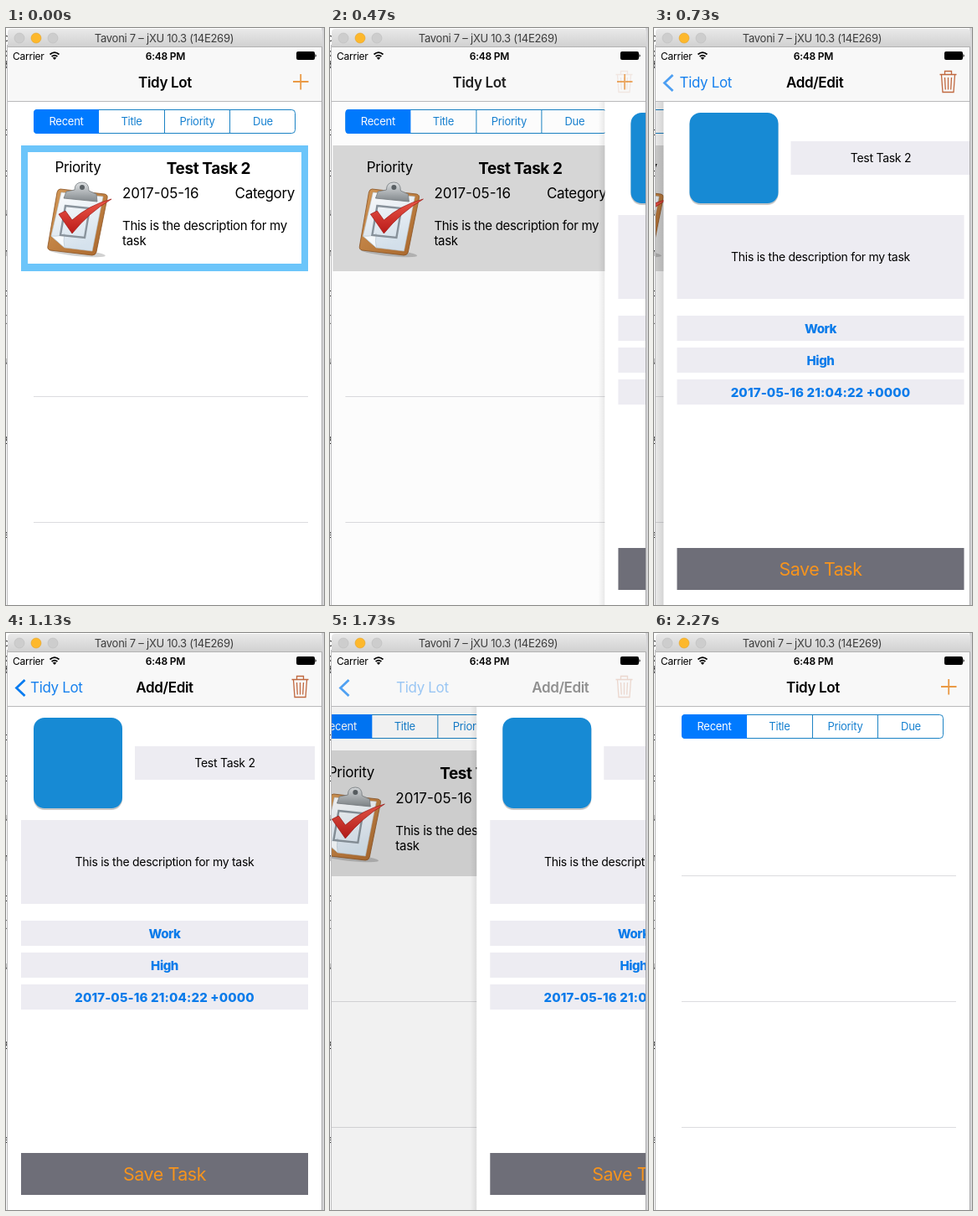
Recreate the animation shown at these times as an HTML page. Size 380 px wide and 688 px high, loop 2340 ms.

```html
<!DOCTYPE html>
<html lang="en">
<head>
<meta charset="utf-8">
<title>Task list</title>
<style>
  html, body { margin: 0; width: 100%; height: 100%; overflow: hidden; background: #fff; }
  svg { display: block; width: 380px; height: 688px; }
  text { font: 17px Inter, "Open Sans", sans-serif; letter-spacing: -.02em; white-space: pre; }
  .mid { text-anchor: middle; }
  .end { text-anchor: end; }
  .semi { font-weight: 600; }
  .s12 { font-size: 12px; }
  .s13 { font-size: 13px; }
  .s14 { font-size: 14px; }
  .s15 { font-size: 15px; }
  .date { letter-spacing: 0; }
  .name { font-size: 18.9px; font-weight: 700; }
  .value { font-size: 15px; font-weight: 800; fill: #0a7bea; letter-spacing: -.03em; }
  .stamp { letter-spacing: .01em; }
  .save { font-size: 21.4px; fill: #f7941d; }
  .seg { font-size: 13px; fill: #1680d0; text-anchor: middle; }
  .code { font: 13px "DejaVu Sans Mono", monospace; letter-spacing: 0; text-anchor: end; fill: #222; }
  .line { fill: none; stroke: #dcdcdf; }
  .field { fill: #edecf2; }
</style>
</head>
<body>
<svg viewBox="0 0 380 688">
  <defs>
    <linearGradient id="bar" x2="0" y2="1">
      <stop stop-color="#e9e9e9"/><stop offset="1" stop-color="#d1d1d1"/>
    </linearGradient>
    <linearGradient id="edge">
      <stop stop-opacity="0"/><stop offset="1" stop-opacity=".08"/>
    </linearGradient>
    <linearGradient id="paper" x2=".3" y2="1">
      <stop stop-color="#fdfdfe"/><stop offset="1" stop-color="#d5e2ed"/>
    </linearGradient>
    <linearGradient id="wood" x2="1" y2="1">
      <stop stop-color="#d59a58"/><stop offset="1" stop-color="#a9662c"/>
    </linearGradient>
    <linearGradient id="metal" x2="0" y2="1">
      <stop stop-color="#dfe2e4"/><stop offset="1" stop-color="#82888c"/>
    </linearGradient>
    <linearGradient id="red" x2="0" y2="1">
      <stop stop-color="#ee5a4b"/><stop offset="1" stop-color="#bb1a18"/>
    </linearGradient>
    <clipPath id="screen"><path d="M2 23H377V688H2z"/></clipPath>
    <clipPath id="strip"><path d="M0 0H2V688H0z"/></clipPath>
  </defs>

  <path fill="#fff" d="M0 0H380V688H0z"/>
  <g id="code" clip-path="url(#strip)"></g>
  <path fill="#d6d6d8" d="M377 0h3v688h-3z"/>
  <path stroke="#a9a9ab" d="M377.5 20V688"/>
  <path stroke="#bdbdbf" d="M1.5 20V688"/>

  <g clip-path="url(#screen)">
    <path fill="#fff" d="M2 23H377V688H2z"/>
    <g id="list">
      <path fill="#fff" d="M2 87H377V688H2z"/>
      <rect x="33.5" y="97.5" width="312" height="28" rx="4" fill="#fff" stroke="#1a82c4"/>
      <path fill="#007aff" d="M111 97H37a4 4 0 0 0-4 4v21a4 4 0 0 0 4 4h74z"/>
      <path stroke="#1a82c4" d="M189.5 97v29M267.5 97v29"/>
      <text class="seg" x="72" y="116" style="fill:#fff">Recent</text>
      <text class="seg" x="150" y="116">Title</text>
      <text class="seg" x="228.500" y="116">Priority</text>
      <text class="seg" x="307" y="116">Due</text>
      <path class="line" d="M33 289.500H361M33 439.500H361M33 589.500H361"/>

      <g id="cell">
        <path id="back" d="M18 140H361V290H18z"/>
        <path id="inner" fill="#fff" d="M26 148H353V281H26z"/>
        <text class="mid" x="86" y="172">Priority</text>
        <text class="mid name" x="242" y="174">Test Task 2</text>
        <text class="date" x="139" y="203">2017-05-16</text>
        <text class="end" x="345" y="203">Category</text>
        <text class="s15" x="139" y="241">This is the description for my</text>
        <text class="s15" x="139" y="259">task</text>
        <g>
          <ellipse cx="85" cy="268" rx="34" ry="4" opacity=".18" transform="rotate(6 85 268)"/>
          <path fill="url(#wood)" stroke="#8a5222" stroke-width=".8" d="M65 192l53 6q4 1 3 5l-13 64q-1 4-5 4l-50-6q-4-1-3-5l11-64q1-4 4-4z"/>
          <path fill="url(#paper)" stroke="#b9c4cc" stroke-width=".6" d="M66 196l50 5-13 65-33-4-16-14z"/>
          <path fill="#f8fbfd" stroke="#b4c3cf" stroke-width=".6" d="M54 248q11 1 16-3-2 9 0 17z"/>
          <path fill="none" stroke="#8a949d" stroke-width="2.400" d="M71 212l29 3-6 35-29-3z"/>
          <path fill="url(#metal)" stroke="#777d80" stroke-width=".8" d="M69 203l3-8 10-2q0-9 9-9 8 0 8 10l9 4 1 9z"/>
          <circle cx="91" cy="190" r="3" fill="#5b6165"/>
          <path fill="url(#red)" stroke="#9d1715" stroke-width=".7" d="M63 222l8-4 8 11q20-18 47-25-27 16-47 41z"/>
        </g>
      </g>
    </g>
    <path id="dim" d="M2 87H377V688H2z"/>

    <g id="page">
      <path fill="url(#edge)" d="M-6 87H2V688h-8z"/>
      <path fill="#fff" d="M2 87H377V688H2z"/>
      <rect x="33" y="102" width="106" height="109" rx="13" opacity=".22"/>
      <rect x="33" y="101" width="106" height="108" rx="13" fill="#178ad4"/>
      <path class="field" d="M154 135H369V175H154zM18 223H361V323H18zM18 343H361V373H18zM18 381H361V411H18zM18 419H361V449H18z"/>
      <text class="mid s14" x="261.500" y="160">Test Task 2</text>
      <text class="mid s14" x="189.500" y="278">This is the description for my task</text>
      <text class="mid value" x="189.500" y="364">Work</text>
      <text class="mid value" x="189.500" y="402">High</text>
      <text class="mid value stamp" x="189.500" y="440">2017-05-16 21:04:22 +0000</text>
      <path fill="#6e6e78" d="M18 620H361V670H18z"/>
      <text class="mid save" x="189.500" y="653">Save Task</text>
    </g>

    <path fill="#f8f8f8" d="M2 23H377V87H2z"/>
    <path stroke="#b9b9bb" d="M2 87.500H377"/>
    <text class="s12" x="8" y="38">Carrier</text>
    <g fill="none" stroke="#000" stroke-width="1.700">
      <path d="M52.500 31.500q5.500-4.600 11 0M54.600 34q3.400-2.800 6.800 0"/>
      <path fill="#000" stroke="none" d="M55.800 35.500q2.200-1.600 4.400 0L58 38z"/>
    </g>
    <text class="mid s12 semi" x="190.500" y="38">6:48 PM</text>
    <rect x="347" y="28" width="22" height="10" rx="2"/>
    <path d="M369.500 31q2.500 2 0 4z"/>

    <text id="listTitle" class="mid semi" x="190" y="71">Tidy Lot</text>
    <path id="plus" fill="none" stroke="#ea9a45" stroke-width="1.800" d="M343 64H361.500M352.200 55V73.500"/>
    <path id="chevron" fill="none" stroke="#0a7cf0" stroke-width="2.800" d="M22.500 56l-10 9.500 10 9.500"/>
    <text id="label" x="29" y="71" fill="#1680ee">Tidy Lot</text>
    <text id="editTitle" class="mid semi" x="189.500" y="71">Add/Edit</text>
    <g id="trash" fill="none" stroke="#c0683f" stroke-width="1.300">
      <path d="M341.500 55.500h20M347.500 55v-3.500h8V55M343.500 56l1.500 20.500h13L359.500 56M347.500 59l.8 14.500M351.500 59v14.500M355.500 59l-.8 14.500"/>
    </g>
  </g>

  <path fill="url(#bar)" d="M2 22V5q0-4 4-4H374q4 0 4 4V22z"/>
  <path stroke="#b3b3b3" d="M2 22.500H378"/>
  <g fill="#cdcdcd" stroke="#bdbdbd" stroke-width=".6">
    <circle cx="16" cy="12" r="6"/>
    <circle cx="36" cy="12" r="6" fill="#fdb82c" stroke="#e3a32a"/>
    <circle cx="56" cy="12" r="6"/>
  </g>
  <text class="mid s13" x="189" y="17" fill="#3c3c3c">Tavoni 7 – jXU 10.3 (14E269)</text>
</svg>

<script>
  const LOOP = 2340, TICK = 200 / 3;
  const PRESS = 130, PUSH = 433, POP = 1649, REMOVE = 2190;
  const el = id => document.getElementById(id);
  const clamp = v => Math.max(0, Math.min(1, v));
  const move = (id, x) => el(id).setAttribute('transform', `translate(${x.toFixed(2)} 0)`);
  const fade = (id, a) => el(id).setAttribute('opacity', clamp(a).toFixed(3));
  const show = (id, on) => { el(id).style.display = on ? '' : 'none'; };

  // Slivers of the editor window behind the simulator
  const bits = { 16: 'c', 34: 'p', 48: '3', 128: 'c', 177: 'c', 224: 'u', 258: '.', 272: 'n',
    320: 'c', 352: '(', 401: 'u', 433: '.', 496: '2', 608: 'e' };
  el('code').innerHTML = Object.entries(bits)
    .map(([y, c]) => `<text class="code" x="3" y="${y}">${c}</text>`).join('');

  // Critically damped spring for the pages
  const spring = ms => {
    const u = Math.max(0, ms) * .0185;
    return 1 - (1 + u) * Math.exp(-u);
  };

  // The standard ease curve (.25, .1, .25, 1) for the bar items
  const ease = x => {
    let lo = 0, hi = 1;
    for (let i = 0; i < 20; i++) {
      const s = (lo + hi) / 2;
      if (.75 * s * (1 - s) + s ** 3 < x) lo = s; else hi = s;
    }
    return .3 * lo * (1 - lo) ** 2 + 3 * lo * lo * (1 - lo) + lo ** 3;
  };

  function draw(t) {
    const popping = t >= POP;
    const since = t - (popping ? POP : PUSH);
    const s = popping ? 1 - spring(since) : spring(since);
    const p = ease(clamp(since / 350));
    const q = popping ? 1 - p : p;

    move('list', -112.8 * s);
    move('page', 375 * (1 - s));
    show('page', s > .005);
    fade('dim', .1 * s);

    const pressed = t >= PRESS;
    show('cell', t < REMOVE);
    show('inner', !pressed);
    el('back').setAttribute('fill', pressed ? '#d9d9d9' : '#6cc5fa');

    move('listTitle', -129 * q);
    move('label', 129 * (1 - q));
    move('editTitle', 221 * (1 - q));

    const leaving = 1 - 1.5 * p, iconLeaving = 1 - 2 * p;
    const late = (p - .4) / .6, arriving = (p - .3) / .6;
    fade('listTitle', popping ? late : leaving);
    fade('plus', popping ? late : iconLeaving);
    fade('label', popping ? leaving : arriving);
    fade('editTitle', popping ? leaving : arriving);
    fade('trash', popping ? iconLeaving : p * 1.3);
    fade('chevron', popping ? 1 - (since - 40) / 150 : (since - 150) / 210);
  }

  let start;
  function tick(now) {
    start ??= now;
    const step = Math.min(34, Math.floor(((now - start) % LOOP + 4) / TICK));
    draw(step * TICK);
    requestAnimationFrame(tick);
  }
  draw(0);
  requestAnimationFrame(tick);
</script>
</body>
</html>
```
